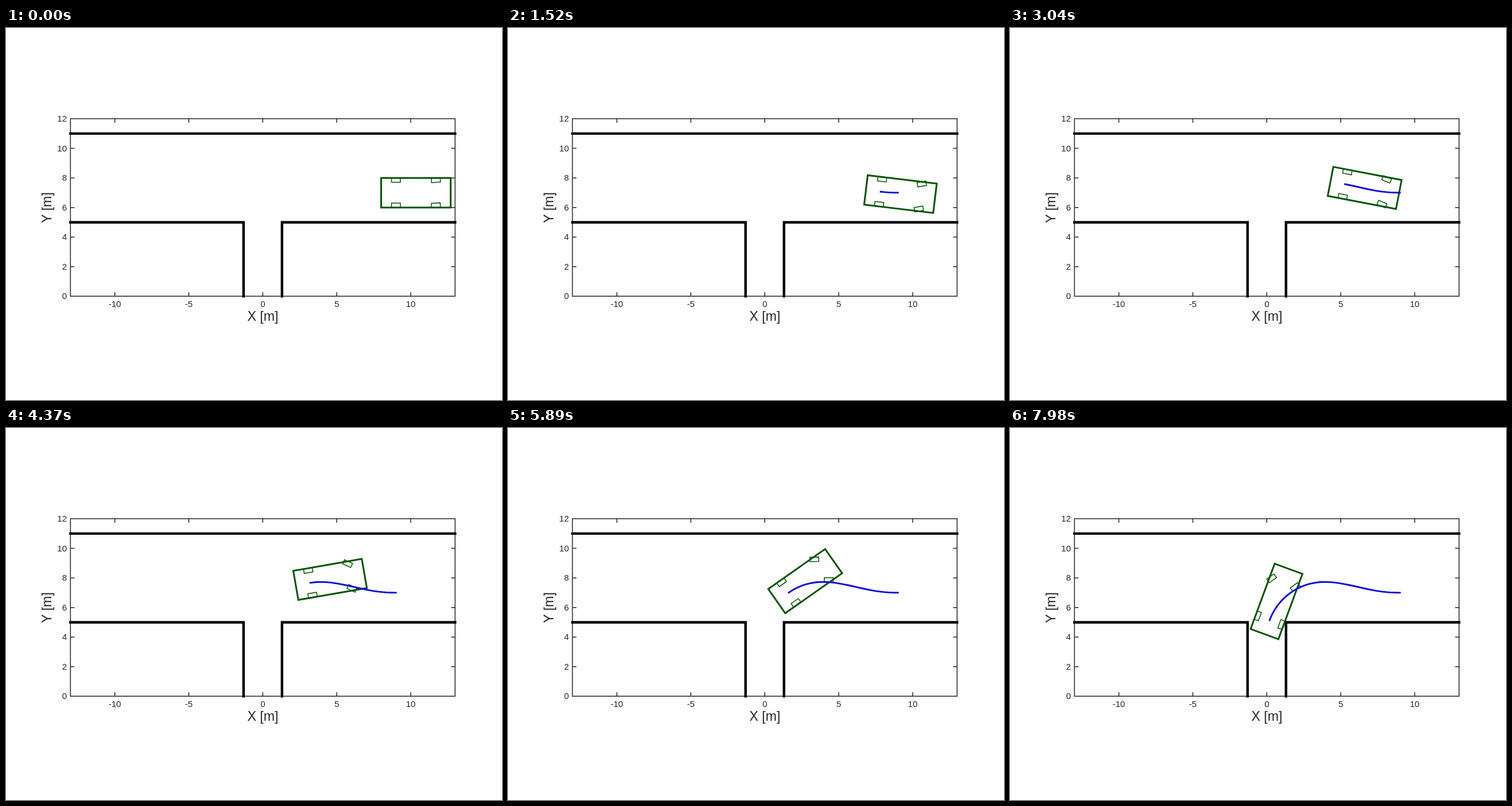
Animation of 864x648 px, one loop 8000 ms. Source, as an HTML page:

```html
<!DOCTYPE html>
<html lang="en">
<head>
<meta charset="utf-8">
<title>Reverse parking</title>
<style>
  html, body { margin: 0; width: 100%; height: 100%; overflow: hidden; background: #fefefe; }
  svg { display: block; width: 100vw; height: 100vh; }
  text { font-family: "Liberation Sans", Arial, sans-serif; fill: #262626; }
  path { fill: none; }
  .tick { font-size: 15px; }
  .label { font-size: 23.2px; text-anchor: middle; }
  #axes { stroke: #262626; stroke-width: 1.5; }
  #walls { stroke: #000; stroke-width: 4.4; stroke-linecap: square; }
  #body { stroke: #005400; stroke-width: 3; }
  #wheels { stroke: #005400; stroke-width: 1.5; }
  #trail { stroke: #0808e6; stroke-width: 2.9; stroke-linecap: square; stroke-linejoin: round; }
</style>
</head>
<body>
<svg viewBox="0 0 864 648">
  <path id="axes"/>
  <g id="ticks"></g>
  <text class="label" x="447.5" y="509.5">X [m]</text>
  <text class="label" transform="translate(78.5 313) rotate(-90)">Y [m]</text>
  <path id="walls"/>
  <path id="body"/>
  <path id="wheels"/>
  <path id="trail"/>
</svg>
<script>
const LOOP = 8000, STEP = 190, LAST = 42;
const SCALE = 25.77, BASE = 2.7, SUB = 20;
const RAD = Math.PI / 180;
const $ = id => document.getElementById(id);

// Metres to stage pixels
const px = x => 447.3 + x * SCALE;
const py = y => 467.3 - y * SCALE;
const line = pts => 'M' + pts.map(([x, y]) => px(x).toFixed(2) + ' ' + py(y).toFixed(2)).join('L');

function drawPlot() {
  let d = line([[-13, 0], [13, 0], [13, 12], [-13, 12]]) + 'Z', labels = '';
  const tick = (x, y, text, anchor) => {
    labels += `<text class="tick" x="${x}" y="${y}" text-anchor="${anchor}">${text}</text>`;
  };
  for (let x = -10; x <= 10; x += 5) {
    d += `M${px(x)} ${py(0)}v-7M${px(x)} ${py(12)}v7`;
    tick(px(x), 486, x, 'middle');
  }
  for (let y = 0; y <= 12; y += 2) {
    d += `M${px(-13)} ${py(y)}h7M${px(13)} ${py(y)}h-7`;
    tick(106, py(y) + 5, y, 'end');
  }
  $('axes').setAttribute('d', d);
  $('ticks').innerHTML = labels;
  $('walls').setAttribute('d',
    line([[-13, 11], [13, 11]]) +
    line([[-13, 5], [-1.3, 5], [-1.3, 0]]) +
    line([[13, 5], [1.3, 5], [1.3, 0]]));
}

// Reversing speed in metres per step
function speed(n) {
  if (n < 17) return Math.min(0.0366 * n, 0.326);
  if (n < 31.5) return 0.326 - 0.0109 * (n - 17);
  return 0.168 + 0.0098 * (n - 31.5);
}

// Steering angle: a slight left lock, then full right lock
const steer = n => RAD * Math.max(Math.min(4 + 4 * n, 16, 4 * (13.1 - n)), -34.4);

// Rear axle poses from a bicycle model
function drive() {
  let x = 9, y = 7, a = 0;
  const poses = [{ x, y, a, turn: steer(0) }];
  for (let i = 0; i < LAST * SUB; i++) {
    const n = (i + 0.5) / SUB, ds = speed(n) / SUB;
    const da = -Math.tan(steer(n)) / BASE * ds;
    x -= Math.cos(a + da / 2) * ds;
    y -= Math.sin(a + da / 2) * ds;
    a += da;
    if ((i + 1) % SUB === 0) poses.push({ x, y, a, turn: steer((i + 1) / SUB) });
  }
  return poses;
}

const place = (p, u, v) => {
  const c = Math.cos(p.a), s = Math.sin(p.a);
  return [p.x + u * c - v * s, p.y + u * s + v * c];
};

const box = (p, u0, u1, v) =>
  line([[u0, v], [u1, v], [u1, -v], [u0, -v]].map(([u, w]) => place(p, u, w))) + 'Z';

function wheel(p, u, v, turn) {
  const [x, y] = place(p, u, v);
  return box({ x, y, a: p.a + turn }, -0.3, 0.3, 0.15);
}

drawPlot();
const poses = drive();

function render(t) {
  const n = Math.min(Math.floor(t / STEP), LAST), p = poses[n];
  $('body').setAttribute('d', box(p, -1, 3.7, 1));
  $('wheels').setAttribute('d', [0.85, -0.85].map(v =>
    wheel(p, 0, v, 0) + wheel(p, BASE, v, p.turn)).join(''));
  $('trail').setAttribute('d', n ? line(poses.slice(0, n + 1).map(q => [q.x, q.y])) : '');
}

const start = performance.now();
function tickFrame() {
  render((performance.now() - start) % LOOP);
  requestAnimationFrame(tickFrame);
}
tickFrame();
</script>
</body>
</html>
```
